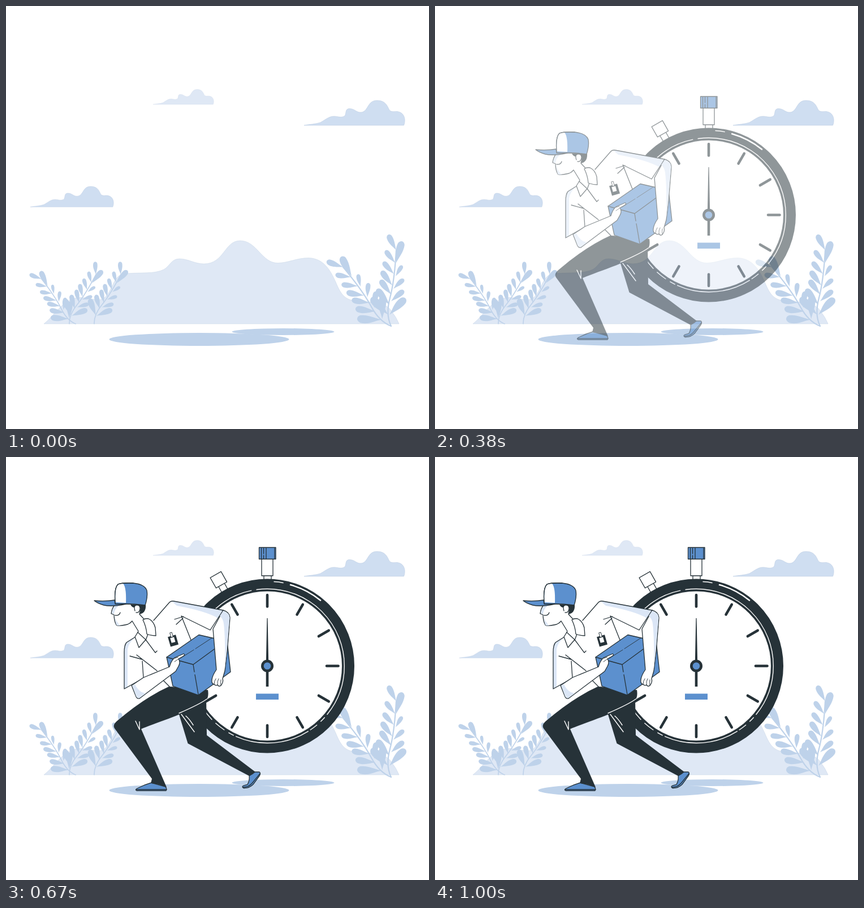
These frames come from a looping animation (748x748 px, 1040 ms). An HTML page:

```html
<!DOCTYPE html>
<html lang="en">
<head>
<meta charset="utf-8">
<title>Express delivery</title>
<style>
  html, body { margin: 0; width: 100%; height: 100%; overflow: hidden; background: #fff; }
  svg { display: block; width: 100%; height: 100%; }
  .hill { fill: #dfe8f5; stroke: #ccd9e8; stroke-width: .6; }
  .cloud { fill: #cfdef1; stroke: #bccde2; stroke-width: .6; }
  .soft { fill: #bed2ea; }
  .stem { fill: none; stroke: #bed2ea; stroke-width: 2.2; stroke-linecap: round; }
  .ink { fill: #263238; }
  .blue { fill: #5c90ce; }
  .white { fill: #fff; }
  .shade { fill: #dbe6f6; }
  .line { stroke: #263238; stroke-width: 1.3; stroke-linejoin: round; stroke-linecap: round; }
  .fine { stroke-width: .9; }
  .none { fill: none; }
  .gleam { fill: none; stroke: #fff; stroke-width: 1.4; stroke-linecap: round; }
  .wide { stroke-width: 2.5; }
  .tick { stroke: #263238; stroke-width: 4.6; stroke-linecap: round; }
  #courier { visibility: hidden; }
</style>
</head>
<body>
<svg viewBox="0 0 748 748">
  <defs>
    <path id="cloud" d="M0 44C10 42 20 42 29 39C38 34 44 28 53 28C60 28 64 31 71 28C76 25 71 14 81 14.5C90 15 92 21 100 21C114 21 111 0 129 0C147 0 148 14 152 18C156 21 160 19 165 19.5C176 21 180 31 177.5 41L176.5 44Z"/>
    <g id="sprig"><path class="stem" d="M0 0Q-10 -20 -2 -50T9 -134"/></g>
  </defs>

  <!-- Scenery -->
  <use href="#cloud" class="hill" transform="translate(260 147.5) scale(.602)"/>
  <use href="#cloud" class="cloud" transform="translate(527 167)"/>
  <use href="#cloud" class="cloud" transform="translate(43 319) scale(.826)"/>
  <path class="hill" d="M67 562C85 548 100 520 125 516C150 513 165 528 178 512C192 494 190 474 214 473C240 471 262 474 279 466C290 460 292 447 307 447C322 447 334 456 350 456C386 456 386 415 414 415C444 415 452 455 481 454.5C500 454 514 445.5 535 445.5C562 446 574 468 583 488C591 507 597 518 615 521C640 525 670 520 682 540Q690 550 695 562Z"/>
  <ellipse class="soft" cx="341.5" cy="589.5" rx="159" ry="11.5"/>
  <ellipse class="soft" cx="490" cy="576" rx="90.5" ry="6"/>
  <use href="#sprig" transform="translate(123 562) rotate(-41) scale(.74)"/>
  <use href="#sprig" transform="translate(112 562) rotate(24.5) scale(.735)"/>
  <use href="#sprig" transform="translate(156 562) rotate(24.5) scale(.735)"/>
  <use href="#sprig" transform="translate(681 566) rotate(-43)"/>
  <use href="#sprig" transform="translate(681 566)"/>

  <g id="courier">
    <!-- Stopwatch -->
    <g class="line">
      <g class="white" transform="rotate(-29.5 462 369.5)">
        <rect x="456" y="203" width="12" height="16"/>
        <rect x="451" y="184" width="22" height="21"/>
      </g>
      <rect class="white" x="456" y="208" width="13" height="10"/>
      <rect class="white" x="452" y="180" width="20" height="30"/>
      <rect class="blue" x="447.5" y="160" width="29.5" height="20.5"/>
      <path class="none" d="M451.5 161V180M455.5 161V171M455.5 174V180M460 161V180M475 161V180"/>
    </g>
    <g transform="translate(462 369.5)">
      <circle r="143" fill="#fff" stroke="#263238" stroke-width="22"/>
      <circle class="gleam" r="136.3" pathLength="360" stroke-dasharray="39 3 4 4 6 2 56 2 4 4 8 4 122 4 98"/>
      <path class="gleam" d="M12 -149Q20 -149 28 -147"/>
      <path class="gleam wide" d="M41 -143.5A149 149 0 0 1 94 -116"/>
      <g id="ticks"></g>
      <path class="ink" d="M-.6 -84.5H.6L2.3 0H-2.3ZM-2.3 6H2.3V36.5H-2.3Z"/>
      <circle class="ink" r="11"/>
      <circle class="blue" r="6.3"/>
      <rect class="blue" x="-20" y="49" width="40" height="10.5"/>
    </g>

    <!-- Feet and trousers -->
    <path class="blue line" d="M430 564L440 557L448 557Q451 559 448 564L437 579Q430 586 420 585.5Q416 583 420 581L427 579Q431 572 430 564Z"/>
    <path class="none line" d="M419 584Q429 584 435 577L449 560"/>
    <path class="blue line" d="M257 576L282 583Q285 587 283 590L231 590Q227 588 234 585Q246 579 257 576Z"/>
    <path class="none line" d="M230 588H284"/>
    <path class="ink" d="M305 452L321.5 506.5L430 564Q437 561 441 557L355 492L354 426Z"/>
    <path class="ink" d="M290 405L357 412Q359 424 354 430C330 450 270 468 239 481L284 584L270 579L256 577L258 569L192 480Q188 474 196 467Q245 425 290 405Z"/>
    <path class="gleam" d="M355 428Q343 437 306 453M310 455L333 486M318 458Q324 463 331 474M229 467L236 482M236 468V482"/>

    <!-- Torso -->
    <path class="white" d="M232 312L211 329L209 410L243 390L289 406L332 408L330 330L368 320L384 271L295 254L262 289L249 313Z"/>
    <path class="shade" d="M293 255L384 271L375 285Q352 272 302 263ZM229 318L213 328Q209 333 209 345V410L215 406V340Q217 328 229 318Z"/>
    <g class="none line">
      <path d="M261 289L289 257Q292 254 297 255L384 271L361 306L310 281L328 326"/>
      <path d="M298 287L314 282M301 296L313 285"/>
      <path d="M229 318L213 328Q209 333 209 345V410L243 391L241 361M219 352L241 358M231 350L267 378M274 391L289 406"/>
    </g>
    <g transform="rotate(-16 295 324)">
      <rect class="ink" x="288" y="316" width="14.5" height="18"/>
      <rect class="white" x="291.5" y="319" width="7" height="9"/>
      <path class="white line fine" d="M293.5 318V310H297V318Z"/>
    </g>

    <!-- Head -->
    <path class="white line" d="M193 260Q187 268 186 277L191 279Q191 290 195 297Q197 300 215 296Q220 294 223 290L234 308L232 312L247 324L251 313L249 292L236 278L240 260Z"/>
    <path class="shade" d="M193 262Q188 268 187 276L191 278Q191 270 200 262ZM191.5 280L195 297Q198 299 202 298Q195 292 191.5 280Z"/>
    <path class="none line" d="M193 280Q200 281 202 275"/>
    <path class="ink" d="M220 261H247Q248 276 236 278Q239 272 237 266Q232 261 228 266Q223 267 220 261Z"/>
    <path class="white line" d="M228 272Q225 264 230 262Q237 261 237 268Q236 276 230 275"/>
    <path class="blue line" d="M193 256Q191 232 198 225Q207 222 225 223Q245 225 249 236Q251 248 246 262Q220 258 193 260Z"/>
    <path class="white" d="M193.5 257Q192 232 198 226Q203 223 207 224Q213 230 212 258Z"/>
    <path class="blue line" d="M156 254C168 255 180 255 192 253L193 260L212 260C198 263 182 264 173 262Q162 259 156 254Z"/>
    <path class="none line" d="M193 256Q191 232 198 225Q207 222 225 223"/>

    <!-- Collar -->
    <path class="white line" d="M242 288Q246 285 252 286Q261 290 264 302L265 316Q257 316 249 313Q248 300 242 288Z"/>
    <path class="white line" d="M233 310L228 318L235 337L247 323Z"/>
    <path class="none line" d="M247 323L264 346L267 343"/>

    <!-- Parcel -->
    <g class="line">
      <path class="blue" d="M284 354L341 314.5L391 326L397 380L340 421L295 405Z"/>
      <path class="none" d="M284 354L331 367L333 380M334 385L340 420M331 367L372 337"/>
      <path class="none fine" d="M308 356L332 341M335 339L364 320"/>
    </g>

    <!-- Arms -->
    <path class="white line" d="M384 271Q395 274 396 284L391 345L387 378L383 392Q385 398 380 404Q377 407 374 403Q371 405 368 402Q363 401 364 394Q365 386 372 376L366 304Z"/>
    <path class="shade" d="M384 272Q395 275 395.5 284L390 345L387 374Q388 320 385 295Q384 286 378 281Z"/>
    <path class="none line fine" d="M368 402Q368 396 371 392M374 403Q373 397 376 392M380 404Q379 398 380 394"/>
    <path class="white line" d="M222 404L243 390L289 371Q292 360 298 355L314 348Q318 350 312 353L305 357Q309 363 305 370L300 379L236 427Q232 428 230 424Z"/>
    <path class="shade" d="M223 404L228 402Q232 411 240 416L247 418L236 426Q232 427 230 423Z"/>
    <path class="none line fine" d="M298 362L305 357M298 356L304 354"/>
  </g>
</svg>
<script>
  const NS = 'http://www.w3.org/2000/svg';
  const add = (parent, tag, attrs) => {
    const node = document.createElementNS(NS, tag);
    for (const key in attrs) node.setAttribute(key, attrs[key]);
    parent.appendChild(node);
  };
  const byId = id => document.getElementById(id);

  // Leaves as foot x, y and tip x, y
  const leaves = [
    [9, -134, -5, -162], [7, -112, -10, -134], [5, -92, -14, -114], [2, -72, -17, -98],
    [0, -56, -19, -82], [-3, -38, -25, -66], [-5, -20, -35, -51],
    [9, -112, 20, -150], [8, -88, 20, -107], [4, -66, 23, -83], [0, -44, 23, -63], [-3, -20, 26, -49]
  ];
  for (const [x, y, tx, ty] of leaves) {
    const turn = Math.atan2(tx - x, y - ty) * 180 / Math.PI;
    const size = Math.hypot(tx - x, ty - y);
    add(byId('sprig'), 'path', {
      class: 'soft',
      d: 'M0 0C-.05 -.25 -.24 -.5 -.17 -.85C-.11 -1.03 .08 -1.04 .14 -.86C.19 -.55 .05 -.25 0 0Z',
      transform: `translate(${x} ${y}) rotate(${turn}) scale(${size})`
    });
  }

  for (let hour = 0; hour < 12; hour++) {
    add(byId('ticks'), 'path', { class: 'tick', d: 'M0 -105V-125.5', transform: `rotate(${hour * 30})` });
  }

  // cubic-bezier(.36, -.01, .5, 1.38)
  const cubic = (a, b, s) => 3 * a * s * (1 - s) ** 2 + 3 * b * s * s * (1 - s) + s ** 3;
  const ease = x => {
    let low = 0, high = 1;
    for (let i = 0; i < 30; i++) {
      const mid = (low + high) / 2;
      if (cubic(.36, .5, mid) < x) low = mid; else high = mid;
    }
    return cubic(-.01, 1.38, low);
  };

  const LOOP = 1040, FPS = 24, LEAD = .3, SLIDE = 44.9;
  const courier = byId('courier');
  const start = performance.now();

  function draw() {
    const time = (performance.now() - start) % LOOP;
    const step = Math.floor(time * FPS / 1000 + .1);
    const progress = ease(Math.min(1, (step + LEAD) / FPS));
    courier.style.visibility = step < 3 ? 'hidden' : 'visible';
    courier.style.opacity = Math.min(1, progress);
    courier.setAttribute('transform', `translate(${SLIDE * (1 - progress)} 0)`);
    requestAnimationFrame(draw);
  }
  draw();
</script>
</body>
</html>
```
